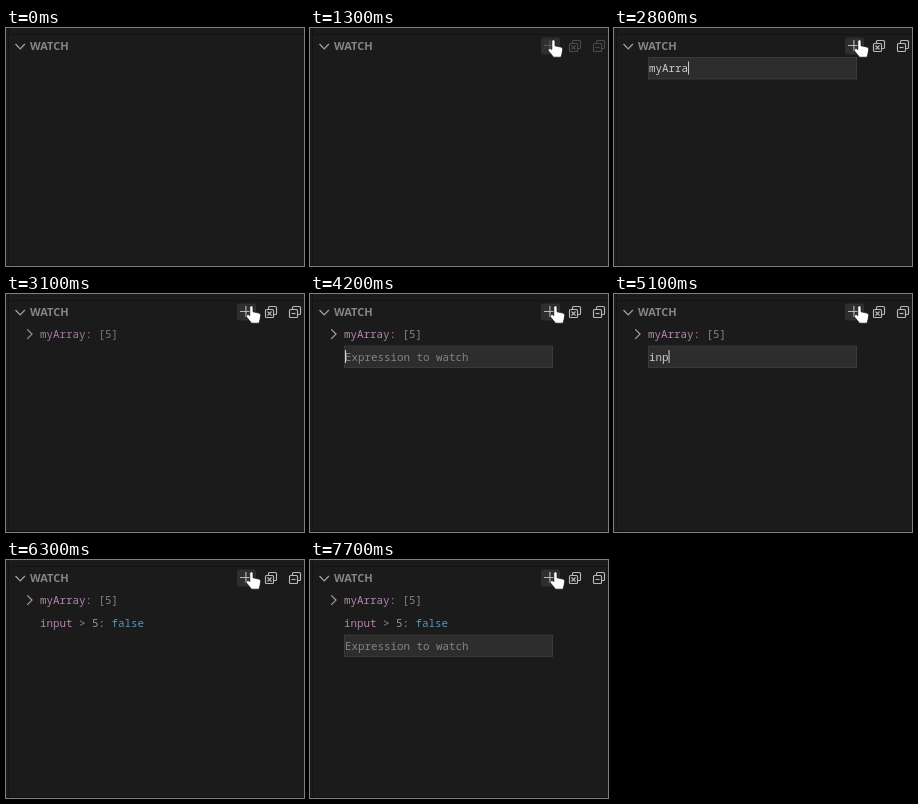
These frames come from a looping animation (298x238 px, 8 s). An HTML page:

```html
<!DOCTYPE html>
<html lang="en">
<head>
<meta charset="utf-8">
<title>Watch panel</title>
<style>
  html, body { margin: 0; width: 100%; height: 100%; overflow: hidden; background: #1b1b1b; }
  svg { display: block; width: 298px; height: 238px; }
  text { white-space: pre; font: 500 10.85px "Noto Sans Mono", "DejaVu Sans Mono", monospace; }
  .title { font: bold 11px "Noto Sans", "Open Sans", sans-serif; fill: #858585; }
  .line { fill: none; stroke: #a5a5a5; stroke-width: 1.2; }
  .name { fill: #b283b0; }
  .array { fill: #858585; }
  .bool { fill: #5596b4; }
  .icon { fill: none; stroke: #b8b8b8; stroke-width: 1.15; }
  .pointer { fill: #fff; stroke: #111; stroke-width: .7; }
</style>
</head>
<body>
<svg viewBox="0 0 298 238">
  <rect width="298" height="238" fill="#1b1b1b"/>
  <path d="M0 6.5H298M2.5 0V238M0 237.5H298" stroke="#131313"/>
  <path class="line" d="M9.5 16l4.7 4.8 4.7-4.8"/>
  <text class="title" x="24" y="22">WATCH</text>

  <g id="actions">
    <rect id="hover" x="231" y="9.5" width="19" height="17" rx="3" fill="#2f2f2f"/>
    <g id="icons" class="icon">
      <path d="M234 17.5h11M239.9 12v11"/>
      <g id="stack">
        <path d="M262.5 15.5v-2q0-1 1-1h6q1 0 1 1v6q0 1-1 1h-2"/>
        <rect x="259.5" y="15.5" width="8" height="8" rx="1"/>
      </g>
      <path d="M261.5 17.5l4 4m0-4l-4 4"/>
      <use href="#stack" x="24"/>
      <path d="M285.5 19.5h4"/>
    </g>
  </g>

  <g id="row1">
    <path class="line" d="M21.2 35.3l4.8 4.8-4.8 4.8"/>
    <text x="34" y="44"><tspan class="name">myArray:</tspan><tspan class="array"> [5]</tspan></text>
  </g>
  <text id="row2" x="34" y="66.5"><tspan class="name">input &gt; 5:</tspan><tspan class="bool"> false</tspan></text>

  <g id="field">
    <rect x="34.5" y="-10.5" width="208" height="21.5" fill="#2d2d2d" stroke="#393939"/>
    <text id="entry" x="35" y="4"></text>
    <rect id="caret" y="-6.5" width="1" height="13" fill="#d0d0d0"/>
  </g>

  <path id="arrow" class="pointer" d="M0 0V14.5l3.5-3.2 2.3 5.3 2.3-1-2.3-5.1H10.6Z"/>
  <path id="hand" class="pointer" d="M4.3 10V1.7a1.6 1.6 0 0 1 3.2 0V6.2l6 1.3q1.8.4 1.7 2.2L14.5 14l-1 3.6H6.1L1 11.3Q.2 9.9 1.5 9.2T4.3 10Z"/>
</svg>
<script>
const LOOP = 8000, ADVANCE = 6.51;
const $ = id => document.getElementById(id);
const show = (id, on) => $(id).style.display = on ? "" : "none";
const move = (id, x, y) => $(id).setAttribute("transform", `translate(${x} ${y})`);

// Each field opens, receives one key per listed time, and closes.
const fields = [
  { open: 1400, close: 3100, y: 40, text: "myArray", keys: [2000, 2100, 2300, 2600, 2700, 2800, 2900] },
  { open: 4200, close: 6300, y: 62.5, text: "input > 5", keys: [4800, 4900, 5100, 5200, 5300, 5600, 5800, 6000, 6200] },
  { open: 7100, close: LOOP, y: 85.5, text: "", keys: [] }
];

function drawField(t) {
  const f = fields.find(f => t >= f.open && t < f.close);
  show("field", f);
  if (!f) return;
  const count = f.keys.filter(k => t >= k).length;
  move("field", 0, f.y);
  $("entry").textContent = count ? f.text.slice(0, count) : "Expression to watch";
  $("entry").setAttribute("fill", count ? "#cccccc" : "#848484");
  $("caret").setAttribute("x", 35 + count * ADVANCE);
  show("caret", count || t < f.open + 600);
}

function drawPointer(t) {
  const onButton = t >= 1100;
  const p = Math.min(1, Math.floor((t - 700) / 100) / 4);
  const ease = 1 - (1 - p) ** 2;
  show("arrow", t >= 700 && !onButton);
  show("hand", onButton);
  show("hover", onButton);
  move("arrow", 211 + 31 * ease, 57 - 44 * ease);
  move("hand", t < 1400 ? 237.5 : 239.5, 11.6);
}

function draw(t) {
  show("actions", t >= 700);
  $("icons").style.opacity = t < 1400 ? .3 : 1;
  show("row1", t >= 3100);
  $("row1").style.opacity = t < 4100 ? .9 : 1;
  show("row2", t >= 6300);
  drawField(t);
  drawPointer(t);
}

function tick() {
  draw(performance.now() % LOOP);
  requestAnimationFrame(tick);
}
tick();
</script>
</body>
</html>
```
